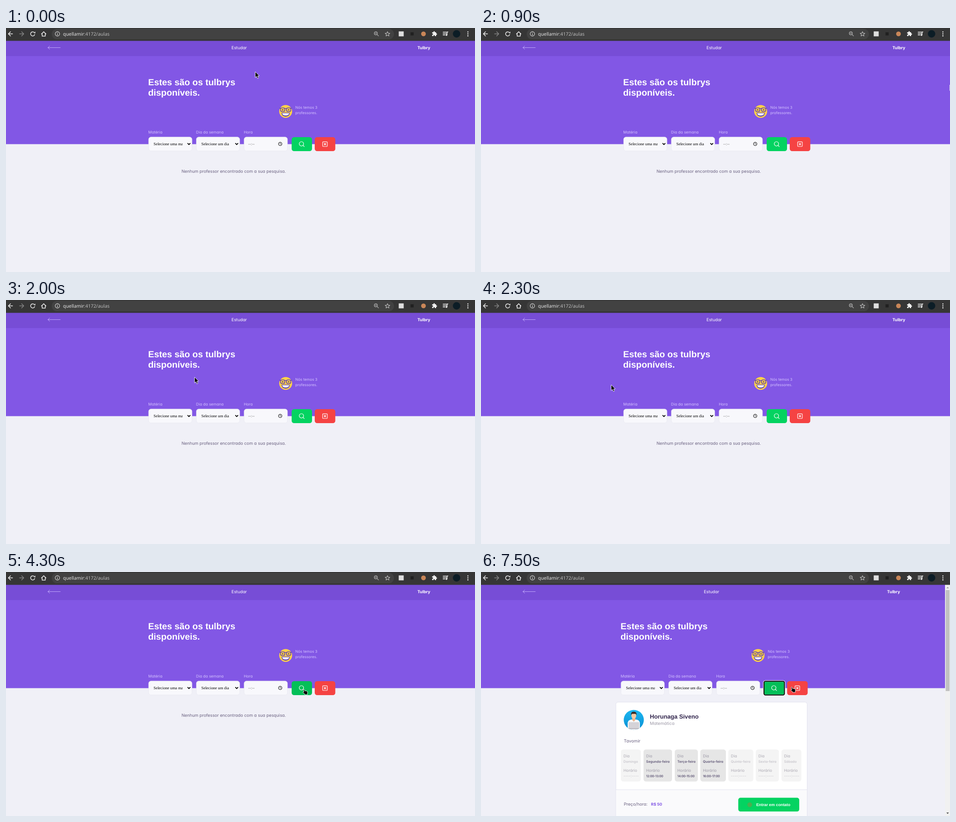
Animation of 1036x541 px, one loop 8 s. Source, as an HTML page:

```html
<!DOCTYPE html>
<html lang="pt">
<head>
<meta charset="utf-8">
<title>Estudar</title>
<style>
  html, body { margin: 0; width: 100%; height: 100%; overflow: hidden; background: #f0f0f7; }
  svg { display: block; width: 1036px; height: 541px; }
  text { font: 9.37px Inter, "Open Sans", sans-serif; font-feature-settings: "cv11"; text-rendering: geometricPrecision; white-space: pre; }
  .url { font: 10.4px "Noto Sans", "Open Sans", sans-serif; }
  .title, .name, .contact { font: bold 19.8px "Liberation Sans", Arial, sans-serif; }
  .name { font-size: 13.1px; }
  .contact { font-size: 8.8px; }
  .brand { font-size: 9.1px; font-weight: 700; }
  .label { font-size: 8.5px; }
  .note { font-size: 8.2px; }
  .field { font: 8.9px "Liberation Serif", "Times New Roman", serif; }
  .day { font-size: 7.45px; font-weight: 500; }
  .on { font-weight: 600; }
  .hour { font-size: 7px; font-weight: 600; letter-spacing: -.3px; }
  .line { fill: none; stroke-linecap: round; stroke-linejoin: round; }
</style>
</head>
<body>
<svg viewBox="0 0 1036 541">
  <defs>
    <linearGradient id="sky" x1="0" y1="0" x2="0" y2="1">
      <stop offset="0" stop-color="#1cb8f2"/><stop offset="1" stop-color="#0a8ed2"/>
    </linearGradient>
    <clipPath id="round"><circle cx="337.5" cy="328" r="22.2"/></clipPath>
    <clipPath id="cut"><rect x="320" y="245" width="70" height="24"/></clipPath>
  </defs>

  <rect width="1036" height="541" fill="#f0f0f7"/>
  <rect y="28" width="1036" height="229.5" fill="#8257e5"/>
  <rect y="28" width="1036" height="34.3" fill="#774dd6"/>
  <path class="line" d="M120 43.5H92.5M96.5 40l-4 3.5 4 3.5" stroke="#c9b3ff" stroke-width=".9"/>

  <text id="brand" class="brand" x="908.7" y="47.3" fill="#fff">Tulbry</text>

  <!-- page column, shifted when the scrollbar appears -->
  <g id="page">
    <text x="498" y="47.3" fill="#fff">Estudar</text>
    <g fill="#fff">
      <text class="title" x="314" y="127">Estes são os tulbrys</text>
      <text class="title" x="314" y="150">disponíveis.</text>
    </g>
    <circle cx="617.8" cy="185" r="14.3" fill="#ffd04a"/>
    <g fill="none" stroke="#5b41ae" stroke-width="1.6">
      <rect x="606.6" y="177.2" width="9.2" height="8" rx="2.6"/>
      <rect x="619.8" y="177.2" width="9.2" height="8" rx="2.6"/>
      <path d="M604 178h3M628.6 178h3M615.8 179.2q2-1.4 4 0"/>
    </g>
    <circle cx="611.2" cy="181.4" r="1.4" fill="#4b3a6b"/><circle cx="624.4" cy="181.4" r="1.4" fill="#4b3a6b"/>
    <path d="M608.6 187.8h18.4q-.6 8.6-9.2 8.6t-9.2-8.6z" fill="#5b41ae"/>
    <path d="M610 188.9h15.6q-.9 5-7.8 5t-7.8-5z" fill="#fff"/>
    <g fill="#d4c2ff">
      <text class="note" x="639" y="179">Nós temos 3</text>
      <text class="note" x="639" y="191.3">professores.</text>
      <text class="label" x="314.3" y="234.2">Matéria</text>
      <text class="label" x="419.8" y="234.2">Dia da semana</text>
      <text class="label" x="525.2" y="234.2">Hora</text>
    </g>
    <g fill="#f8f8fc" stroke="#e6e6f0" stroke-width=".7">
      <rect x="315" y="241.7" width="95.9" height="31" rx="5.3"/>
      <rect x="420.4" y="241.7" width="95.9" height="31" rx="5.3"/>
      <rect x="525.9" y="241.7" width="95.9" height="31" rx="5.3"/>
    </g>
    <text class="field" x="326" y="260" clip-path="url(#cut)">Selecione uma matéria</text>
    <text class="field" x="431.5" y="260">Selecione um dia</text>
    <text class="field" x="535" y="260" fill="#666">--:--</text>
    <path d="M401 255.3l3.1 3.1 3.1-3.1M506.5 255.3l3.1 3.1 3.1-3.1" fill="none" stroke="#000" stroke-width="1.8"/>
    <circle cx="605.7" cy="257" r="3.7" fill="none" stroke="#111" stroke-width="1.1"/>
    <path d="M605.6 254.6v2.5l1.8 1" fill="none" stroke="#111" stroke-width=".9"/>
    <rect id="search" x="631" y="242" width="45" height="31" rx="5.3"/>
    <g id="focus" fill="none">
      <rect x="630.3" y="241.7" width="46.4" height="31.6" rx="4" stroke="#fff" stroke-width="3"/>
      <rect x="630.9" y="242.3" width="45.2" height="30.4" rx="3.2" stroke="#000" stroke-width="2"/>
    </g>
    <rect x="682" y="242" width="45.4" height="31" rx="5.3" fill="#f54343"/>
    <g class="line" stroke="#fff" stroke-width="1.15">
      <circle cx="652.6" cy="256.8" r="4.8"/><path d="M656.2 260.4l2.6 2.6"/>
      <rect x="699.4" y="252.3" width="10.4" height="10.4" rx="1.2"/>
      <path d="M702.6 255.5l4 4M706.6 255.5l-4 4"/>
    </g>
  </g>

  <text id="empty" x="387.7" y="321" fill="#6a6180">Nenhum professor encontrado com a sua pesquisa.</text>

  <g id="results">
    <rect x="298" y="288.5" width="422.5" height="270" rx="5" fill="#fff" stroke="#e2e2ee"/>
    <path d="M298.5 483H720V541H298.5z" fill="#fafafc"/>
    <path d="M298 482.7H720.5" stroke="#e2e2ee"/>
    <g clip-path="url(#round)">
      <rect x="315" y="305" width="45" height="46" fill="url(#sky)"/>
      <path d="M324 351V334q1-6 9-7h9q8 1 9 7V351z" fill="#f6f8fa"/>
      <path d="M334 322h7v6l-3.5 4-3.5-4z" fill="#e9b48d"/>
      <ellipse cx="337.5" cy="318.5" rx="5.4" ry="6.6" fill="#f5c9a4"/>
      <path d="M331.6 318q-1.6-8 5.4-8.2 8-.2 6.4 8.2l-1.5-3.6h-8.6z" fill="#3a2a26"/>
      <rect x="326" y="333" width="23.5" height="14" rx="1.5" fill="#d5d3d8"/>
      <rect x="323.5" y="346.4" width="28" height="2" fill="#b5b2ba"/>
    </g>
    <text class="name" x="373" y="325.2" fill="#32264d">Horunaga Siveno</text>
    <text x="373" y="338.8" style="font-size:9.6px" fill="#9c98a6">Matemática</text>
    <text x="315.5" y="378.3" style="font-size:9.6px" fill="#6a6180">Tavomir</text>
    <g id="days"></g>
    <text x="315.5" y="518" fill="#6a6180">Preço/hora:</text>
    <text x="375.6" y="518" style="font-size:8.6px;font-weight:700" fill="#8257e5">R$ 50</text>
    <rect x="568.3" y="500.5" width="134.7" height="30.6" rx="5" fill="#04d361"/>
    <circle cx="593.6" cy="516" r="5.2" fill="#4caf50"/>
    <text class="contact" x="608" y="519.2" fill="#fff">Entrar em contato</text>
    <rect x="1025" y="28" width="11" height="513" fill="#f1f1f1"/>
    <rect x="1026.5" y="40" width="8.5" height="224" fill="#c1c1c1"/>
    <path d="M1028 36.2h5.6l-2.8-3.4z" fill="#a3a3a3"/>
    <path d="M1028 533.2h5.6l-2.8 3.4z" fill="#505050"/>
  </g>

  <!-- browser bar -->
  <rect width="1036" height="28.5" fill="#363636"/>
  <rect x="101" y="2" width="756" height="23" rx="11.5" fill="#424242"/>
  <g class="line" stroke="#f1f1f1" stroke-width="1.5">
    <path d="M14.5 13H5.5M10 8.3L5.3 13l4.7 4.7"/>
    <path d="M30 13h9M34.5 8.3l4.7 4.7-4.7 4.7" stroke="#858585"/>
    <path d="M62.4 10a4.6 4.6 0 1 0 1 4.4"/>
    <path d="M78.3 13.2L83.3 8.3l5 4.9M79.8 12v6h7v-6"/>
    <circle cx="113.6" cy="13" r="4.9" stroke="#dcdcdc" stroke-width="1.1"/>
    <path d="M113.6 12.6v3M113.6 10.4v.1" stroke="#dcdcdc" stroke-width="1.2"/>
    <g stroke="#b9b9b9" stroke-width="1.2">
      <circle cx="816.9" cy="11.7" r="3.4"/><path d="M819.5 14.3l3.4 3.4M815.5 11.7h2.8"/>
      <path d="M842.7 8l1.5 3.4 3.7.3-2.8 2.4.9 3.7-3.3-2-3.3 2 .9-3.7-2.8-2.4 3.7-.3z"/>
    </g>
    <path d="M965.5 9.2h7.5M965.5 12.4h7.5M965.5 15.6h4.3M974.3 15V8.8h2"/>
  </g>
  <path d="M62.2 11.7h2.6V7.6z" fill="#f1f1f1"/>
  <circle cx="973" cy="15.8" r="1.8" fill="#f1f1f1"/>
  <rect x="867.5" y="7.5" width="11" height="11" fill="#dedede"/>
  <rect x="893.5" y="9.5" width="7" height="7" fill="#202020"/>
  <circle cx="922.2" cy="13" r="5.2" fill="#c98658"/>
  <path transform="translate(940.3 6.6) scale(.52)" fill="#f1f1f1" d="M20.5 11H19V7c0-1.1-.9-2-2-2h-4V3.5a2.5 2.5 0 0 0-5 0V5H4c-1.1 0-2 .9-2 2v3.8h1.5a2.7 2.7 0 0 1 0 5.4H2V20c0 1.1.9 2 2 2h3.8v-1.5a2.7 2.7 0 0 1 5.4 0V22H17c1.1 0 2-.9 2-2v-4h1.5a2.5 2.5 0 0 0 0-5z"/>
  <circle cx="995.3" cy="13" r="8.2" fill="#0c1d26"/>
  <g fill="#f1f1f1"><circle cx="1020.3" cy="8.8" r="1.3"/><circle cx="1020.3" cy="13.1" r="1.3"/><circle cx="1020.3" cy="17.4" r="1.3"/></g>
  <text class="url" x="126" y="16.8" fill="#e6e6e6">quellamir<tspan fill="#bdbdbd">:4172/aulas</tspan></text>

  <path id="arrow" d="M.5 0V12.8L3.5 10.1 5.6 14.8 7.9 13.8 5.8 9.2H9.7z" fill="#000" stroke="#fff" stroke-width=".9"/>
  <path id="hand" d="M1.2 1.1Q2.6-.2 3.6 1.4L4.8 4.4 6.2 4 7.6 4.3 9 4.6 10.2 5.4Q11.3 8.4 10.3 10.2V12.4H4.3V11L.7 8.2Q-.3 6.9 1 6.2L2.5 6.7z" fill="#000" stroke="#fff" stroke-width=".9"/>
</svg>
<script>
const LOOP = 8000, STEP = 100;
const HOVER = 4300, FOUND = 5800, MOVED = 7500;
const $ = id => document.getElementById(id);

// x, width, weekday, hours
const days = [
  [309, 44, 'Domingo'],
  [359, 63, 'Segunda-feira', '12:00-13:00'],
  [428, 51, 'Terça-feira', '14:00-15:00'],
  [484.5, 56.5, 'Quarta-feira', '16:00-17:00'],
  [546.3, 55.2, 'Quinta-feira'],
  [607, 51, 'Sexta-feira'],
  [663.7, 43.8, 'Sábado']
];

$('days').innerHTML = days.map(([x, w, day, hours]) => {
  const left = x + 5.8;
  const grey = hours ? '#9c98a6' : '#aaa7b1';
  const ink = hours ? '#5f5676' : '#c3c1c8';
  return `<rect x="${x}" y="393.5" width="${w}" height="71" rx="5.3" fill="${hours ? '#e6e6e6' : '#f4f4f4'}"/>
    <text class="label" x="${left}" y="410.6" fill="${grey}">Dia</text>
    <text class="day ${hours ? 'on' : ''}" x="${left}" y="423.3" fill="${ink}">${day}</text>
    <text class="label" x="${left}" y="442.6" fill="${grey}">Horário</text>
    <text class="${hours ? 'hour' : 'label'}" x="${left}" y="455.3" fill="${ink}">${hours || '----:----'}</text>`;
}).join('');

// time, x, y of the pointer tip
const path = [
  [0, 550, 97], [100, 581, 102], [300, 581, 102], [600, 800, 109],
  [900, 1035, 126], [1000, 1028, 155], [1100, 965, 181], [1200, 858, 149],
  [1600, 858, 149], [2000, 416, 171], [2300, 287, 188], [2400, 288, 189],
  [2500, 297, 189], [2600, 345.5, 194]
];

function pointAt(t) {
  const next = path.findIndex(p => p[0] > t);
  if (next < 0) return path[path.length - 1].slice(1);
  const a = path[next - 1], b = path[next];
  const k = (t - a[0]) / (b[0] - a[0]);
  return [a[1] + (b[1] - a[1]) * k, a[2] + (b[2] - a[2]) * k];
}

const move = (id, x, y) => $(id).setAttribute('transform', `translate(${x} ${y})`);
const show = (id, on) => $(id).setAttribute('visibility', on ? 'visible' : 'hidden');

function draw(time) {
  const t = Math.floor((time % LOOP) / STEP) * STEP;
  const hover = t >= HOVER, found = t >= FOUND;
  show('arrow', !hover);
  show('hand', hover);
  show('empty', !found);
  show('results', found);
  show('focus', found);
  move('page', found ? -5.8 : 0, 0);
  move('brand', found ? -11.6 : 0, 0);
  $('search').setAttribute('fill', hover ? '#04bf58' : '#04d361');
  move('arrow', ...pointAt(t));
  move('hand', ...(t >= MOVED ? [684, 254.5] : [655.5, 259.5]));
}

const start = performance.now();
function tick() {
  draw(performance.now() - start);
  requestAnimationFrame(tick);
}
draw(0);
requestAnimationFrame(tick);
</script>
</body>
</html>
```
